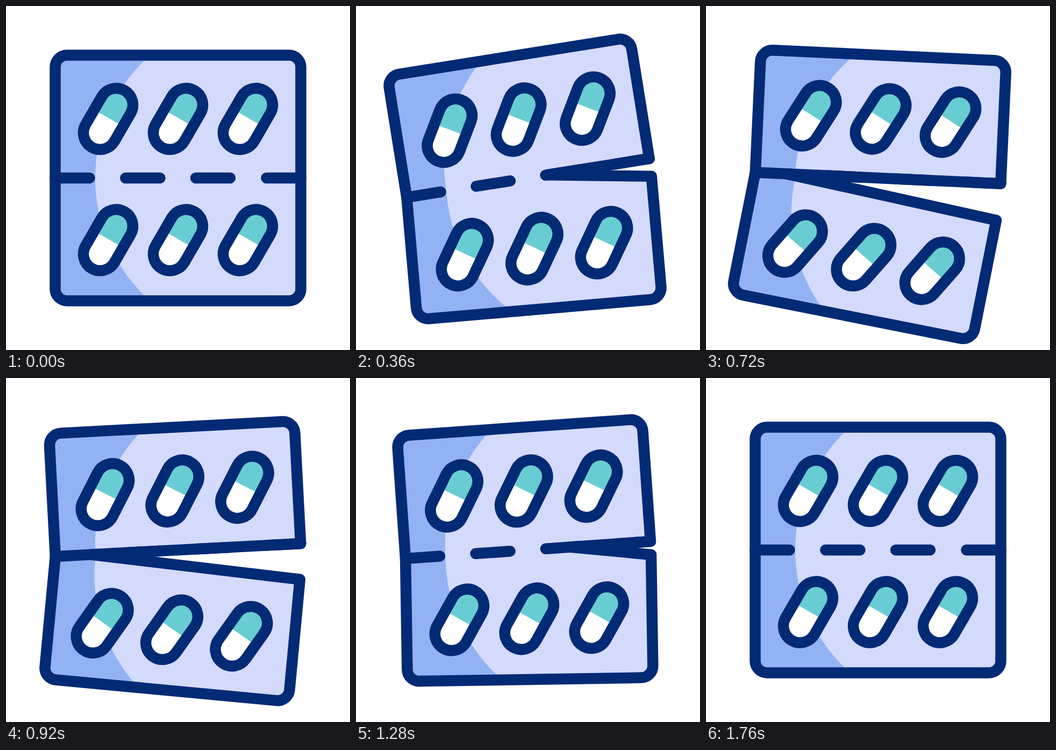
An HTML page without scripts for the animation above (2000 ms loop, 640 px wide and 640 px high).

```html
<!DOCTYPE html>
<html lang="en">
<head>
<meta charset="utf-8">
<title>Blister pack</title>
<style>
  html, body { margin: 0; width: 100%; height: 100%; overflow: hidden; background: #fff; }
  svg { display: block; width: 100vw; height: 100vh; }
  .ink { fill: none; stroke: #032a75; stroke-width: 20.5; stroke-linecap: round; stroke-linejoin: round; }
  .foil { fill: #d4dafc; }
  .shade { fill: #93b2f4; }
  .gap { fill: #fff; }
</style>
</head>
<body>
<svg viewBox="0 0 640 640">
  <defs>
    <g id="pill" transform="rotate(30)">
      <rect x="-31" y="-61" width="62" height="122" rx="31" fill="#fff"/>
      <path d="M-26-1.6V-30a26 26 0 0 1 52 0V-1.6z" fill="#68cdd2"/>
      <rect class="ink" x="-31" y="-61" width="62" height="122" rx="31"/>
    </g>
    <g id="row">
      <use href="#pill" transform="translate(190)"/>
      <use href="#pill" transform="translate(320)"/>
      <use href="#pill" transform="translate(450)"/>
    </g>
    <path id="upper" d="M91.5 320V113.5a22 22 0 0 1 22-22H526.5a22 22 0 0 1 22 22V320"/>
    <path id="lower" d="M91.5 320V526.5a22 22 0 0 0 22 22H526.5a22 22 0 0 0 22-22V320"/>
  </defs>

  <!-- whole pack sways about its centre -->
  <g>
    <animateTransform attributeName="transform" type="rotate" dur="2s" repeatCount="indefinite"
      calcMode="spline" keyTimes="0;.0465;.2165;.38;.5485;.7135;1"
      values="0 320 320;0 320 320;-10 320 320;3 320 320;-10 320 320;0 320 320;0 320 320"
      keySplines="0 0 1 1;.42 0 .58 1;.42 0 .58 1;.42 0 .58 1;.42 0 .58 1;0 0 1 1"/>

    <!-- lower half swings on the left hinge -->
    <g>
      <animateTransform attributeName="transform" type="rotate" dur="2s" repeatCount="indefinite"
        keyTimes="0;.014;.415;.59;.845;1"
        values="0 91.5 320;0 91.5 320;9.95 91.5 320;3.87 91.5 320;0 91.5 320;0 91.5 320"/>
      <!-- spare foil under the upper half, bared as the pack opens -->
      <path class="foil" d="M91.5 330V320L300 285L548.5 320V330z"/>
      <use href="#lower" class="foil"/>
      <path class="shade" d="M91.5 300H166.6A306.7 306.7 0 0 0 268 548.5H113.5a22 22 0 0 1-22-22z"/>
      <use href="#lower" class="ink"/>
      <use href="#row" transform="translate(0 435.5)"/>
    </g>

    <!-- upper half -->
    <use href="#upper" class="foil"/>
    <path class="shade" d="M91.5 320H166A306.7 306.7 0 0 1 268 91.5H113.5a22 22 0 0 0-22 22z"/>

    <!-- the tear: tip runs left along the fold while the lower corner drops -->
    <path class="ink gap" style="fill:#fff" d="M548.5 320L548.5 320L548.5 320">
      <animate attributeName="d" dur="2s" repeatCount="indefinite"
        keyTimes="0;.014;.415;.59;.845;1"
        values="M548.5 320L548.5 320L548.5 320;M548.5 320L548.5 320L548.5 320;M548.5 320L86 320L541.6 399;M548.5 320L361 320L547.5 350.8;M548.5 320L548.5 320L548.5 320;M548.5 320L548.5 320L548.5 320"/>
    </path>

    <use href="#upper" class="ink"/>
    <path class="ink" d="M91.5 320H155.5M222.3 320H286.5M353 320H417M484.5 320H548.5"/>
    <use href="#row" transform="translate(0 210)"/>
  </g>
</svg>
</body>
</html>
```
